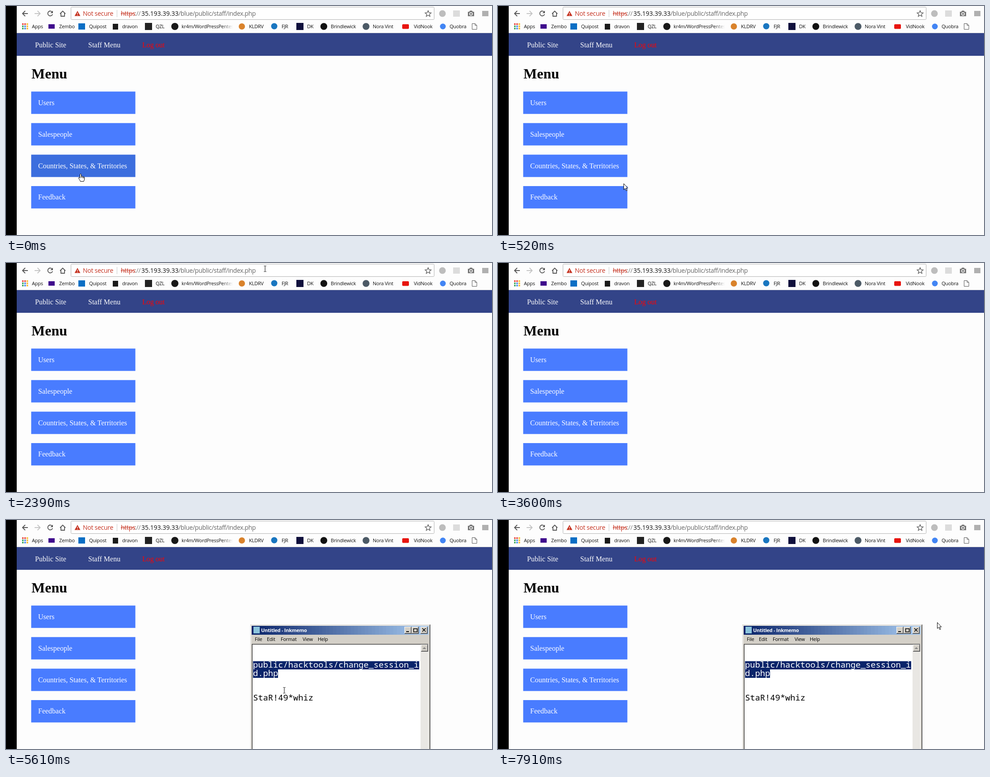
Animation, 1088 px wide and 515 px high, one loop 8000 ms. Source, as an HTML page:

```html
<!DOCTYPE html>
<html lang="en">
<head>
<meta charset="utf-8">
<title>Staff menu</title>
<style>
html, body { margin: 0; width: 100%; height: 100%; overflow: hidden; background: #fdfdfd; }
svg { display: block; width: 100%; height: 100%; }
text { white-space: pre; }
.page { font: 16px "Liberation Serif", "Times New Roman", serif; fill: #fff; }
.page .head { font-size: 32px; font-weight: 700; fill: #000; }
.url { font: 14px "Open Sans", "Noto Sans", sans-serif; letter-spacing: -.27px; }
.url .host { letter-spacing: 0; fill: #111; }
.url .path { letter-spacing: -.34px; fill: #666; }
.ui { font: 11px "Open Sans", "Noto Sans", sans-serif; letter-spacing: -.25px; }
.bold { font-weight: 700; }
.mono { font: 18.76px "Noto Sans Mono", "DejaVu Sans Mono", monospace; fill: #fff; }
.tile { fill: #497cff; }
.line { fill: none; stroke: #555; stroke-width: 1.8; }

#stateTile, #backTile, #cursor, #hand, #arrow, #beam, #pad, #live, #caret, #title, #menu {
  animation: 8s step-end infinite;
}
#stateTile { animation-name: stateTile; }
#backTile { animation-name: backTile; }
#cursor { animation-name: move; }
#hand { animation-name: hand; }
#arrow { animation-name: arrow; }
#beam { animation-name: beam; }
#pad { animation-name: pad; }
#live { animation-name: live; }
#caret { animation-name: caret; }
#title { animation-name: title; }
#menu { animation-name: menu; }

@keyframes stateTile { 0% { fill: #3c6ede } 1.5%, 100% { fill: #497cff } }
@keyframes backTile { 0% { fill: #497cff } 1.5% { fill: #3c6ede } 6.5%, 100% { fill: #497cff } }
@keyframes hand { 0% { opacity: 1 } 6.5%, 100% { opacity: 0 } }
@keyframes arrow {
  0% { opacity: 0 } 6.5% { opacity: 1 } 25.375% { opacity: 0 } 37.625% { opacity: 1 }
  45% { opacity: 0 } 62% { opacity: 1 } 63.5% { opacity: 0 } 97%, 100% { opacity: 1 }
}
@keyframes beam {
  0% { opacity: 0 } 25.375% { opacity: 1 } 37.625% { opacity: 0 }
  63.5% { opacity: 1 } 97%, 100% { opacity: 0 }
}
@keyframes pad { 0% { opacity: 0 } 56.375%, 100% { opacity: 1 } }
@keyframes live { 0% { opacity: 0 } 70.125%, 100% { opacity: 1 } }
@keyframes title { 0% { fill: #d4d0c8 } 70.125%, 100% { fill: #fff } }
@keyframes menu { 0% { fill: #808080 } 70.125%, 100% { fill: #000 } }
@keyframes caret {
  0% { opacity: 1 } 70.125% { opacity: 0 } 75.875% { opacity: 1 }
  81.625% { opacity: 0 } 89.375% { opacity: 1 } 95.125%, 100% { opacity: 0 }
}
@keyframes move {
  0% { transform: translate(167px, 377px) }
  1.5% { transform: translate(190px, 409px) }
  3.375% { transform: translate(222px, 414px) }
  4.875% { transform: translate(256px, 409px) }
  6.5% { transform: translate(281px, 399px) }
  8.375% { transform: translate(318px, 330px) }
  10% { transform: translate(356px, 256px) }
  12% { transform: translate(400px, 248px) }
  13.875% { transform: translate(411px, 249px) }
  15.625% { transform: translate(407px, 237px) }
  17.125% { transform: translate(432px, 198px) }
  18.625% { transform: translate(515px, 128px) }
  20.125% { transform: translate(572px, 89px) }
  22% { transform: translate(572px, 63px) }
  23.875% { transform: translate(576px, 45px) }
  25.375% { transform: translate(584px, 22px) }
  26.875% { transform: translate(594px, 8px) }
  28.375% { transform: translate(588px, 10px) }
  29.875% { transform: translate(580px, 13px) }
  37.625% { transform: translate(570px, 67px) }
  39.5% { transform: translate(548px, 190px) }
  41.125% { transform: translate(470px, 360px) }
  43.125% { transform: translate(434px, 392px) }
  62% { transform: translate(521px, 419px) }
  63.5% { transform: translate(560px, 405px) }
  65% { transform: translate(600px, 390px) }
  66.625% { transform: translate(623px, 383px) }
  74% { transform: translate(623px, 381px) }
  75.875% { transform: translate(622px, 377px) }
  95.125% { transform: translate(618px, 370px) }
  97% { transform: translate(814px, 273px) }
  98.875%, 100% { transform: translate(983px, 230px) }
}
</style>
</head>
<body>
<svg viewBox="0 0 1088 515" preserveAspectRatio="none">
  <defs>
    <linearGradient id="fade" gradientUnits="userSpaceOnUse" x1="484" x2="508" y1="0" y2="0">
      <stop stop-color="#111"/><stop offset="1" stop-color="#111" stop-opacity="0"/>
    </linearGradient>
  </defs>
  <rect width="1088" height="515" fill="#fdfdfd"/>

  <!-- toolbar -->
  <g class="line">
    <path d="M49 17H37.5M43 11l-6 6 6 6"/>
    <path d="M64 17H76M70.5 11l6 6-6 6" stroke="#c4c4c4"/>
    <path d="M103.5 13.5A5.5 5.5 0 1 0 104.300 18.5"/>
    <path d="M121 17.5L127 11.5 133 17.5M123 16.5V23H131V16.5"/>
  </g>
  <path d="M105 10.5V16H99.5Z" fill="#555"/>
  <rect x="145.5" y="2.5" width="813" height="28" rx="2" fill="#fff" stroke="#b2b2b2"/>
  <path d="M160 11L166.5 22.5H153.5Z" fill="#c5311f"/>
  <path d="M160 15v3.5M160 19.8v1.4" stroke="#fff" stroke-width="1.3"/>
  <path d="M248.5 9V25" stroke="#c8c8c8"/>
  <g class="url">
    <text x="172" y="22" fill="#c5311f">Not secure</text>
    <text x="257" y="22" fill="#c5311f">https</text>
    <text x="288" y="22" fill="#777">://</text>
    <text class="host" x="303" y="22">35.193.39.33</text>
    <text class="path" x="386" y="22">/blue/public/staff/index.php</text>
  </g>
  <path d="M257 17.5H288" stroke="#c5311f"/>
  <path d="M945 10.5l1.9 4.5 4.9.4-3.7 3.2 1.1 4.7-4.2-2.5-4.2 2.5 1.1-4.7-3.7-3.2 4.9-.4Z" fill="none" stroke="#555" stroke-width="1.3"/>
  <circle cx="977" cy="17" r="7.5" fill="#bdbdbd"/>
  <rect x="1001" y="10" width="15" height="14" fill="#dcdcdc"/>
  <path d="M1034 13h3l1.5-2.5h5L1045 13h3v10h-14Z" fill="#777"/>
  <circle cx="1041" cy="17.8" r="3" fill="#777" stroke="#fff" stroke-width="1.5"/>
  <rect x="1066" y="11" width="14" height="12" fill="#b0b0b0"/>

  <!-- bookmarks -->
  <g id="apps"></g>
  <rect x="95" y="41" width="14" height="10" fill="#3f0a8c"/>
  <rect x="162" y="39" width="15" height="14" fill="#0a6ec4"/>
  <rect x="239" y="40" width="12" height="13" fill="#1a1a1a"/>
  <rect x="311" y="38" width="16" height="16" fill="#222"/>
  <circle cx="378" cy="46" r="8" fill="#181818"/>
  <circle cx="528" cy="46" r="7" fill="#d9822b"/>
  <circle cx="600.5" cy="45.5" r="7" fill="#1976c0"/>
  <rect x="650" y="38" width="16" height="16" fill="#10103c"/>
  <circle cx="711.5" cy="46" r="7.7" fill="#111"/>
  <circle cx="806" cy="46" r="7.7" fill="#4c5a66"/>
  <rect x="887" y="41" width="15" height="10.5" rx="2" fill="#e8150f"/>
  <circle cx="978" cy="46" r="6.5" fill="#4285f4"/>
  <path d="M1043.5 39.5h6.5l4 4v9h-10.5ZM1050 39.5v4h4" fill="#fff" stroke="#555"/>
  <g class="ui" fill="#111">
    <text x="58" y="50">Apps</text>
    <text x="119" y="50">Zembo</text>
    <text x="186" y="50">Quipost</text>
    <text x="260" y="50">dravon</text>
    <text x="335" y="50">QZL</text>
    <text x="393" y="50" fill="url(#fade)">kr4m/WordPressPentest</text>
    <text x="544" y="50">KLDRV</text>
    <text x="617" y="50">FJR</text>
    <text x="674" y="50">DK</text>
    <text x="727" y="50">Brindlewick</text>
    <text x="821" y="50">Nora Vint</text>
    <text x="913" y="50">VidNook</text>
    <text x="993" y="50">Quobra</text>
  </g>
  <path d="M24 60.5H1088" stroke="#d8d8dc"/>

  <!-- page -->
  <g class="page">
    <rect x="24" y="61" width="1064" height="51" fill="#334488"/>
    <text x="65" y="93">Public Site</text>
    <text x="184" y="93">Staff Menu</text>
    <text x="305" y="93" fill="#f00">Log out</text>
    <text class="head" x="57" y="163">Menu</text>
    <rect class="tile" x="56.4" y="192.4" width="233.2" height="50.3"/>
    <rect class="tile" x="56.4" y="263.3" width="233.2" height="50.3"/>
    <rect class="tile" id="stateTile" x="56.4" y="334.3" width="233.2" height="50.3"/>
    <rect class="tile" id="backTile" x="56.4" y="405" width="233.2" height="50.3"/>
    <text x="72" y="223">Users</text>
    <text x="72" y="294">Salespeople</text>
    <text x="72" y="365">Countries, States, &amp; Territories</text>
    <text x="72" y="435">Feedback</text>
  </g>
  <rect width="24" height="515" fill="#000"/>

  <!-- text editor -->
  <g id="pad">
    <rect x="547" y="235" width="403" height="290" fill="#d4d0c8"/>
    <path d="M548.5 520V236.5H948" fill="none" stroke="#fff"/>
    <path d="M949.5 235V520" stroke="#404040"/>
    <path d="M948.5 236V520" stroke="#808080"/>
    <g id="idle"></g>
    <g id="live"></g>
    <rect x="554" y="240" width="14" height="15" fill="#8cc4dc"/>
    <text id="title" class="ui bold" x="571" y="252">Untitled - Inkmemo</text>
    <g id="menu" class="ui">
      <text x="557" y="272">File</text>
      <text x="584" y="272">Edit</text>
      <text x="615" y="272">Format</text>
      <text x="664" y="272">View</text>
      <text x="698" y="272">Help</text>
    </g>
    <rect x="552" y="280" width="376" height="240" fill="#fff"/>
    <path d="M551 520V279.5H945" fill="none" stroke="#404040" stroke-width="1.5"/>
    <rect x="928" y="280" width="17" height="240" fill="#e9e7e3"/>
    <path d="M945.5 279V520" stroke="#fff"/>
    <g id="buttons"></g>
    <g fill="none" stroke="#000" stroke-width="1.5">
      <path d="M896 251h6" stroke-width="2"/>
      <path d="M912 244.5h9M912.5 244v7.5h8V244"/>
      <path d="M932 243.5l7.5 7.5M939.5 243.5l-7.5 7.5"/>
    </g>
    <path d="M932.500 290L936.500 286 940.500 290Z" fill="#808080"/>
    <path d="M553 317.5H925V336H609V355H553Z" fill="#0a246a"/>
    <rect id="caret" x="609" y="336" width="1" height="19" fill="#0a246a"/>
    <g class="mono">
      <text x="553" y="332">public/hacktools/change_session_i</text>
      <text x="553" y="350.5">d.php</text>
      <text x="553" y="406" fill="#000">StaR!49*whiz</text>
    </g>
  </g>

  <g id="cursor" stroke="#000">
    <path id="hand" d="M-1.5 10V1.5Q0-.5 1.5 1.5V6Q3.5 5 4.3 6.7 6 6 6.7 7.5 8.5 7 8.5 9V13Q8 15 7 17.5H-.5Q-1 15-4.5 10.5-5 8.5-3.2 8.5ZM1.5 6V9.5M4.3 6.7V10M6.7 7.5V10.5" fill="#fff"/>
    <path id="arrow" d="M.5.5V14L3.6 11.2 6 16.5 8 15.6 5.7 10.4H9.7Z" fill="#fff"/>
    <path id="beam" d="M-2.5-6.5H-.5M.5-6.5H2.5M0-6V6M-2.5 6.5H-.5M.5 6.5H2.5" fill="none"/>
  </g>
</svg>
<script>
const add = (id, x, y, width, height, fill) => {
  const r = document.createElementNS("http://www.w3.org/2000/svg", "rect");
  Object.entries({ x, y, width, height, fill }).forEach(([k, v]) => r.setAttribute(k, v));
  document.getElementById(id).append(r);
};

// title bar shaded in n flat bands
const bands = (id, n, from, to) => {
  const w = 396 / n;
  for (let i = 0; i < n; i++) {
    const c = from.map((a, k) => Math.round(a + (to[k] - a) * i / (n - 1)));
    add(id, 550 + i * w, 238, w + (i < n - 1 ? .5 : 0), 20, `rgb(${c})`);
  }
};
bands("idle", 10, [128, 128, 128], [192, 192, 192]);
bands("live", 50, [10, 36, 106], [166, 202, 240]);

// raised classic button
const bevel = (x, y) => {
  add("buttons", x, y, 16, 16, "#404040");
  add("buttons", x, y, 15, 15, "#fff");
  add("buttons", x + 1, y + 1, 14, 14, "#808080");
  add("buttons", x + 1, y + 1, 13, 13, "#d4d0c8");
};
bevel(892, 240);
bevel(908, 240);
bevel(928, 240);
bevel(929, 280);

const dots = ["#e8453c", "#e8453c", "#f9bb2d", "#3aa757", "#4688f1", "#f9bb2d", "#3aa757", "#4688f1", "#f9bb2d"];
dots.forEach((c, i) => add("apps", 36 + i % 3 * 5, 39 + Math.floor(i / 3) * 5, 3.5, 3.5, c));
</script>
</body>
</html>
```
